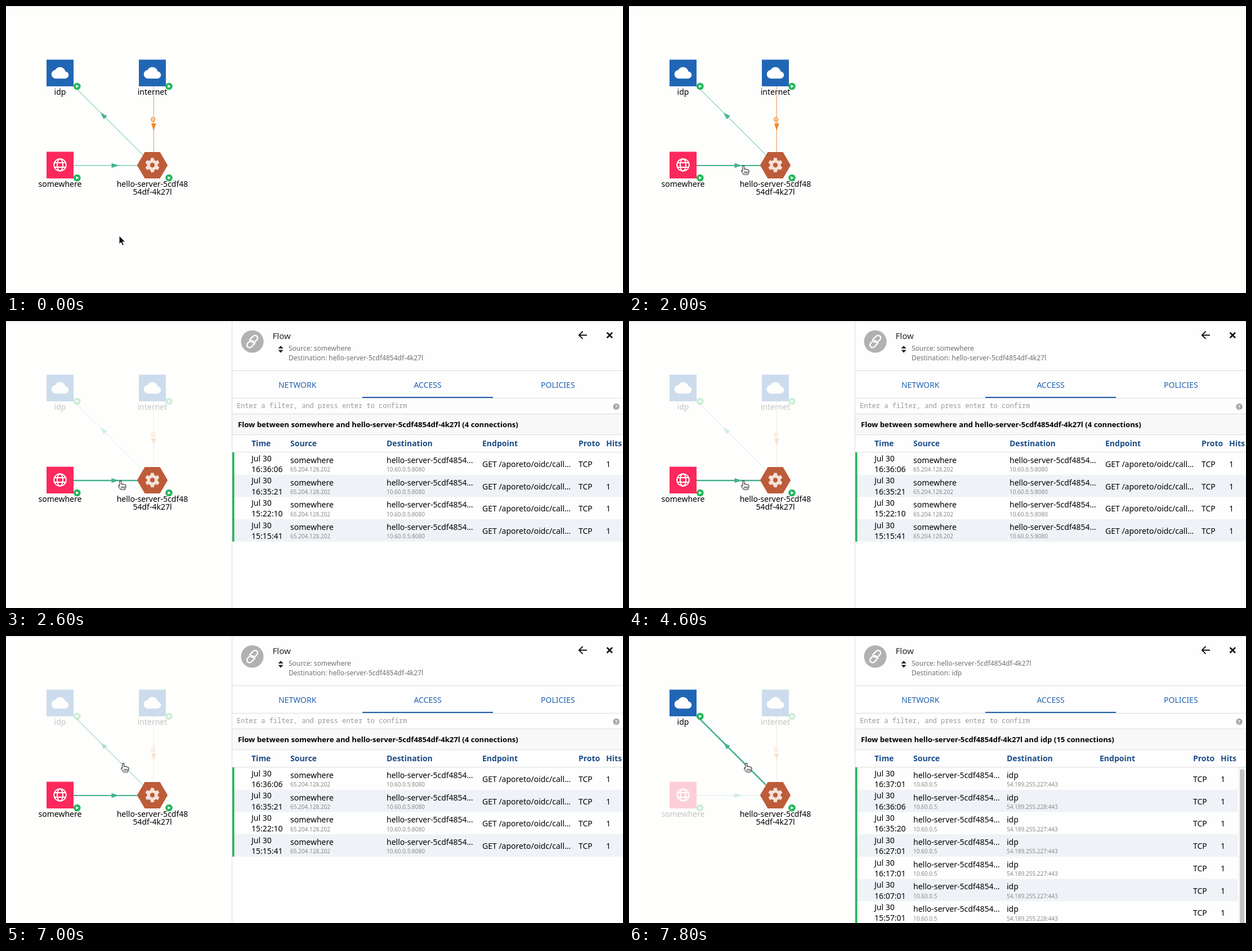
These frames come from a looping animation (1096 px wide and 511 px high, 8 s). An HTML page:

```html
<!DOCTYPE html>
<html lang="en">
<head>
<meta charset="utf-8">
<title>Flow map</title>
<style>
html, body { margin: 0; width: 100%; height: 100%; overflow: hidden; background: #fefefd; }
svg { display: block; width: 1096px; height: 511px; font: 14px "Noto Sans", "Open Sans", sans-serif; }
text { white-space: pre; }
.label { text-anchor: middle; paint-order: stroke; stroke: #fefefd; stroke-width: 2.5px; stroke-linejoin: round; }
.bold { font-weight: 700; }
.head { font-weight: 700; fill: #1b4c87; }
.tab { fill: #1f60ae; text-anchor: middle; }
.small { font-size: 10px; fill: #8a8a8a; }
.info { font-size: 12px; fill: #717171; }
.filter { font: 12px "Noto Sans Mono", "DejaVu Sans Mono", monospace; fill: #9a9a9a; }

#idp, #net, #some, #idpEdge, #someEdge, #idpLine, #someLine, #cursor { animation: 8s linear infinite; }
#idp { animation-name: idp; }
#net { animation-name: net; }
#some, #someEdge { animation-name: some; }
#idpEdge { animation-name: idpEdge; }
#idpLine { animation-name: idpLine; animation-timing-function: step-end; }
#someLine { animation-name: someLine; animation-timing-function: step-end; }
#cursor { animation-name: travel; }
#arrow, #hand, #panel, #first, #second, #wait1, #rows1, #wait2, #rows2 { visibility: hidden; animation: 8s step-end infinite; }
#arrow { animation-name: arrow; }
#hand { animation-name: hand; }
#panel { animation-name: panel; }
#first { animation-name: first; }
#second { animation-name: second; }
#wait1 { animation-name: wait1; }
#rows1 { animation-name: rows1; }
#wait2 { animation-name: wait2; }
#rows2 { animation-name: rows2; }

@keyframes idp { 0%, 27% { opacity: 1 } 29.5%, 90% { opacity: .22 } 93%, 100% { opacity: 1 } }
@keyframes net { 0%, 27% { opacity: 1 } 29.5%, 100% { opacity: .22 } }
@keyframes some { 0%, 90% { opacity: 1 } 93%, 100% { opacity: .22 } }
@keyframes idpEdge { 0%, 27% { opacity: 1 } 29.5%, 84.9% { opacity: .22 } 85%, 90% { opacity: .42 } 93%, 100% { opacity: 1 } }
@keyframes idpLine { 0% { stroke-width: 1 } 85% { stroke-width: 1.6 } 90%, 100% { stroke-width: 2.5 } }
@keyframes someLine { 0% { stroke-width: 1 } 17.5% { stroke-width: 1.8 } 27.5% { stroke-width: 2.7 } 80% { stroke-width: 1.8 } 90%, 100% { stroke-width: 1 } }
@keyframes travel {
  0%, 7.5% { transform: translate(201px, 409px); animation-timing-function: ease-in-out }
  17.5%, 78% { transform: translate(203.5px, 285px); animation-timing-function: ease-in-out }
  85%, 100% { transform: translate(208.5px, 227px) }
}
@keyframes arrow { 0% { visibility: visible } 17% { visibility: hidden } 80% { visibility: visible } 84%, 100% { visibility: hidden } }
@keyframes hand { 0% { visibility: hidden } 17% { visibility: visible } 80% { visibility: hidden } 84%, 100% { visibility: visible } }
@keyframes panel { 0% { visibility: hidden } 27.5%, 100% { visibility: visible } }
@keyframes first { 0% { visibility: hidden } 27.5% { visibility: visible } 90%, 100% { visibility: hidden } }
@keyframes second { 0% { visibility: hidden } 90%, 100% { visibility: visible } }
@keyframes wait1 { 0% { visibility: hidden } 27.5% { visibility: visible } 32.5%, 100% { visibility: hidden } }
@keyframes rows1 { 0% { visibility: hidden } 32.5% { visibility: visible } 90%, 100% { visibility: hidden } }
@keyframes wait2 { 0% { visibility: hidden } 90% { visibility: visible } 95%, 100% { visibility: hidden } }
@keyframes rows2 { 0% { visibility: hidden } 95%, 100% { visibility: visible } }
</style>
</head>
<body>
<svg viewBox="0 0 1096 511">
  <defs>
    <path id="cloud" fill="#fff" transform="scale(1.27) translate(-12 -12)" d="M19.35 10.04C18.67 6.59 15.64 4 12 4 9.11 4 6.6 5.64 5.35 8.04 2.34 8.36 0 10.91 0 14c0 3.31 2.69 6 6 6h13c2.76 0 5-2.24 5-5 0-2.64-2.05-4.78-4.65-4.96z"/>
    <g id="play"><circle r="6.3" fill="#22b75b"/><path d="M-2-3 3.2 0-2 3z" fill="#fff"/></g>
    <path id="tip" d="M0 0-13-4.3V4.3z"/>
  </defs>
  <rect width="1096" height="511" fill="#fefefd"/>

  <g id="idpEdge" stroke="#4ab48e" fill="#4ab48e">
    <path id="idpLine" d="M243 265 125 147"/>
    <use href="#tip" stroke="none" transform="translate(167.5 189.5) rotate(225)"/>
  </g>
  <g id="someEdge" stroke="#45b28b" fill="#45b28b">
    <path id="someLine" d="M120 284H234"/>
    <use href="#tip" stroke="none" transform="translate(200.5 284)"/>
  </g>

  <g id="net">
    <path d="M262.3 143V260" stroke="#f3a263" stroke-width="1.2"/>
    <use href="#tip" fill="#f6821f" transform="translate(262.3 222) rotate(90)"/>
    <circle cx="261.3" cy="202" r="3.4" fill="#fdeedd" stroke="#ee8a30" stroke-width="1.5"/>
    <path d="M260 202.5h2.6" stroke="#ee8a30" stroke-width="1.6"/>
    <rect x="236" y="95.5" width="48" height="47.5" fill="#2166b5"/>
    <use href="#cloud" x="0" transform="translate(260 119)"/>
    <text class="label" x="260" y="158">internet</text>
    <use href="#play" transform="translate(289.5 143)"/>
  </g>
  <g id="idp">
    <rect x="72" y="95.5" width="48" height="47.5" fill="#2166b5"/>
    <use href="#cloud" transform="translate(96 119)"/>
    <text class="label" x="96" y="158">idp</text>
    <use href="#play" transform="translate(126.3 143)"/>
  </g>
  <g id="some">
    <rect x="72" y="259.5" width="48" height="47.5" fill="#fd285b"/>
    <g transform="translate(96 283)" fill="none" stroke="#fff" stroke-width="2">
      <circle r="10.8"/><ellipse rx="5" ry="10.8"/><path d="M-10-4H10M-10 4H10"/>
    </g>
    <text class="label" x="96" y="322">somewhere</text>
    <use href="#play" transform="translate(126.3 306)"/>
  </g>
  <path d="M246.5 260h27l13.7 23.5L273.500 307h-27L232.800 283.500z" fill="#bd5c39"/>
  <g id="gear" transform="translate(260 283.300)" fill="#f6e2d9">
    <circle r="6.900" fill="none" stroke="#f6e2d9" stroke-width="5.400"/>
  </g>
  <text class="label" x="260" y="321.500">hello-server-5cdf48</text>
  <text class="label" x="260" y="335.500">54df-4k27l</text>
  <use href="#play" transform="translate(289.500 306)"/>

  <g id="panel">
    <rect x="402" width="694" height="511" fill="#fefefe"/>
    <rect x="402" y="166" width="694" height="36" fill="#f8f8f8"/>
    <path d="M401.500 0V511M402 88.500H1096M402 137.500H1096M402 165.500H1096M402 202.500H1096M402 233.500H1096" stroke="#dcdcdc"/>
    <rect x="633" y="135" width="232" height="2" fill="#1f60ae"/>
    <circle cx="437.500" cy="36.500" r="20" fill="#b1b1b1"/>
    <g transform="translate(437.500 36.500) rotate(-45)" fill="none" stroke="#fff" stroke-width="2.400" stroke-linecap="round">
      <path d="M2 4.500H-7a4.500 4.500 0 0 1 0-9H-2a4.500 4.500 0 0 1 4.500 4.500" transform="translate(-1 1)"/>
      <path d="M-2-4.500H7a4.500 4.500 0 0 1 0 9H2a4.500 4.500 0 0 1-4.500-4.500" transform="translate(1 -1)"/>
    </g>
    <text x="473.500" y="32" font-size="15" font-weight="500" fill="#222">Flow</text>
    <path d="M483.500 49 488 44l4.500 5zM483.500 51.500h9L488 56.500z" fill="#222"/>
    <path d="M1032 25.200H1018M1024.500 18.500l-6.700 6.700 6.700 6.700" fill="none" stroke="#111" stroke-width="1.900"/>
    <path d="M1067.500 20.500l9.500 9.500M1077 20.500l-9.500 9.500" stroke="#111" stroke-width="2.500"/>
    <text class="tab" x="517.700" y="119">NETWORK</text>
    <text class="tab" x="749" y="119">ACCESS</text>
    <text class="tab" x="980.300" y="119">POLICIES</text>
    <text class="filter" x="410" y="155">Enter a filter, and press enter to confirm</text>
    <circle cx="1084" cy="152.500" r="5.700" fill="#a6a6a6"/>
    <text x="1084" y="156" font-size="9" font-weight="700" fill="#fff" text-anchor="middle">?</text>
  </g>
  <g id="first"></g>
  <g id="wait1"></g>
  <g id="rows1"></g>
  <g id="second"></g>
  <g id="wait2"></g>
  <g id="rows2"></g>

  <path d="M0 .5H1096" stroke="#d9d9d9"/>
  <g id="cursor">
    <path id="arrow" d="M0 0V15.200L3.400 12l2.500 5.600 2.600-1.100L6 11h4.800z" fill="#111" stroke="#fff" stroke-width="1"/>
    <path id="hand" d="M-1.700 8.500V.8a1.500 1.500 0 0 1 3 0V5.500q1.300-1 2.600.3 1.300-.9 2.500.5 2.600-.6 2.600 2V11L7.500 15.300H.3L-3.700 9.700q-.8-1.900.7-2zM1.700 9.500v3.500M4 9.500v3.500M6.200 9.500v3.500" fill="#fff" stroke="#222" stroke-width="1.100" stroke-linejoin="round"/>
  </g>
</svg>
<script>
const $ = id => document.getElementById(id);
const text = (x, y, s, cls = '') => `<text x="${x}" y="${y}" class="${cls}">${s}</text>`;
const box = (x, y, w, h, fill) => `<rect x="${x}" y="${y}" width="${w}" height="${h}" fill="${fill}"/>`;
const top0 = 234, rowH = 39.7;
const titles = ['Time', 'Source', 'Destination', 'Endpoint', 'Proto', 'Hits'];
const pod = 'hello-server-5cdf4854df-4k27l', shortPod = 'hello-server-5cdf4854…';

function heading(from, to, count, cols) {
  return text(502, 53, `Source: ${from}`, 'info') +
    text(502, 69.5, `Destination: ${to}`, 'info') +
    `<text x="412" y="188.5" class="bold" font-size="13.15">Flow between ${from} and ${to} (${count} connections)</text>` +
    titles.map((t, i) => text(cols[i], 223, t, 'head')).join('');
}

const stripe = (i, w) => i % 2 ? box(402, top0 + i * rowH, w, rowH, '#eff3f7') : '';

function skeleton(n, cols) {
  let out = '';
  for (let i = 0; i < n; i++) {
    out += stripe(i, 694);
    for (let c = 0; c < 4; c++)
      out += box(cols[c], top0 + 14 + i * rowH, cols[c + 1] - cols[c] - 10, 12, i % 2 ? '#c4d0dd' : '#d0d9e5');
  }
  return out;
}

function table(times, cols, width, row) {
  const body = times.map((time, i) => {
    const y = top0 + i * rowH, r = row(i);
    return stripe(i, width) +
      text(cols[0], y + 15.7, 'Jul 30') + text(cols[0], y + 35, time) +
      text(cols[1], y + 18.8, r.from) + text(cols[1], y + 34.3, r.fromIp, 'small') +
      text(cols[2], y + 18.8, r.to) + text(cols[2], y + 34.3, r.toIp, 'small') +
      text(cols[3], y + 26, r.call) + text(cols[4], y + 26, 'TCP') + text(cols[5], y + 26, '1');
  }).join('');
  return body + box(402, top0, 3.5, times.length * rowH, '#22b759');
}

const colsA = [436, 505, 676, 846, 1017, 1066];
const colsB = [436, 505, 671, 836, 1002, 1051];

$('first').innerHTML = heading('somewhere', pod, 4, colsA);
$('wait1').innerHTML = skeleton(4, colsA);
$('rows1').innerHTML = table(['16:36:06', '16:35:21', '15:22:10', '15:15:41'], colsA, 694, () => ({
  from: 'somewhere', fromIp: '65.204.128.202', to: shortPod, toIp: '10.60.0.5:8080', call: 'GET /aporeto/oidc/call…'
}));

$('second').innerHTML = heading(pod, 'idp', 15, colsB);
$('wait2').innerHTML = skeleton(7, colsB);
$('rows2').innerHTML = table(
  ['16:37:01', '16:36:06', '16:35:20', '16:27:01', '16:17:01', '16:07:01', '15:57:01'], colsB, 679, i => ({
    from: shortPod, fromIp: '10.60.0.5', to: 'idp', toIp: `54.189.255.${i === 1 || i === 6 ? 228 : 227}:443`, call: ''
  })) + box(1081.5, 234, 14.5, 277, '#f7f7f7') +
  '<rect x="1085" y="237" width="8" height="290" rx="4" fill="#c2c2c2"/>';

for (let a = 0; a < 360; a += 60)
  $('gear').innerHTML += `<path d="M-3.500-8.500-2.700-12.800H2.700L3.500-8.500z" transform="rotate(${a})"/>`;
</script>
</body>
</html>
```
